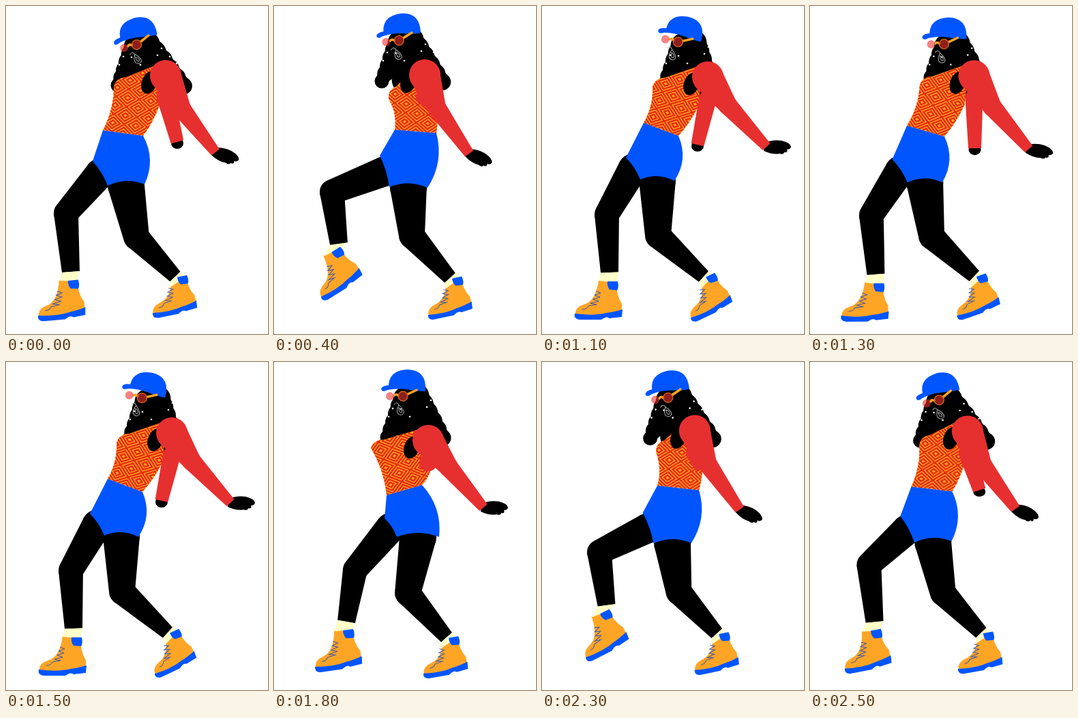
Animation of 384x480 px, one loop 2600 ms. Source, as an HTML page with a canvas:

```html
<!DOCTYPE html>
<html lang="en">
<head>
<meta charset="utf-8">
<title>Dancer</title>
<style>
html, body { margin: 0; height: 100%; overflow: hidden; background: #fff; }
canvas { display: block; }
</style>
</head>
<body>
<canvas id="stage" width="384" height="480"></canvas>
<script>
const ctx = document.getElementById('stage').getContext('2d');
const BLUE = '#0055ff', RED = '#e63030', ORANGE = '#ffa526', CREAM = '#ffffc8', BLACK = '#000';

// The dance runs forward for 13 steps, then back again.
const STEP = 100, HALF = 13;
const keys = [0, 4, 6, 8, 11], SPAN = 15;

// Joints at the key steps: x, y and, where a part turns, degrees.
const rig = {
  head: [[192,38,-14], [186,32,-7], [190,30,-2], [194,32,0], [208,36,12]],
  shoulder: [[234,102], [221,101], [220,108], [226,115], [243,104]],
  elbow: [[257,150], [238,148], [236,152], [256,154], [272,145]],
  wrist: [[307,214,18], [286,216,22], [291,213,-5], [307,213,0], [329,206,0]],
  farWrist: [[251,199], [228,142], [226,138], [223,152], [228,203]],
  chest: [[158,118], [168,136], [151,136], [142,126], [162,118]],
  waistL: [[142,182], [177,181], [176,187], [165,195], [149,171]],
  waistR: [[201,190], [238,186], [233,180], [217,180], [200,190]],
  hemL: [[127,227], [155,219], [168,222], [162,229], [123,222]],
  crotch: [[149,263], [169,265], [181,257], [180,256], [144,254]],
  hemR: [[203,261], [225,266], [240,267], [242,256], [194,256]],
  kneeL: [[88,303], [85,272], [101,281], [119,304], [95,305]],
  kneeR: [[191,338], [202,336], [198,340], [196,338], [170,336]],
  ankleL: [[95,389,-5], [95,348,-32], [99,361,-20], [106,380,-8], [99,390,0]],
  ankleR: [[248,396,-11], [258,398,-12], [254,401,-12], [253,403,-10], [237,396,-25]]
};

const cap = new Path2D('M28,10Q30,-20 2,-21Q-25,-20 -26,2Q-37,3 -37,8Q-35,13 -28,9Q-14,6 0,8Q14,11 27,11Z');
const mouth = new Path2D('M-18,30Q-14,25 -11,31Q-3,38 -4,43Q-8,48 -13,43Q-15,38 -11,31M-11,35Q-5,38 -7,42Q-11,43 -11,35');
const fist = new Path2D('M-3,-6Q10,-11 22,-9Q35,-6 36,0Q35,4 30,4Q32,9 26,8Q25,12 19,10Q10,12 -4,6Z');
const sole = new Path2D('M23,42Q10,46 0,47Q-20,52 -47,48Q-49,56 -40,57L-8,57Q0,51 4,55L22,53Z');
const collar = new Path2D('M1,1L16,1Q18,10 15,14L4,13Q0,8 1,1Z');
const laces = new Path2D('M-16,15L-9,18L-18,21L-10,24L-20,27L-12,30L-24,33L-15,35L-27,37Q-29,42 -36,42');
const sparkles = [[-20,36], [-8,37], [-26,48], [30,34], [36,24], [48,36], [58,46], [46,16], [5,48]];

// Smooth cyclic blend of one joint's key places.
function blend(joint, f) {
  const n = keys.length;
  const at = i => keys[(i + n) % n] + SPAN * Math.floor(i / n);
  const val = (i, j) => joint[(i + n) % n][j];
  const i = keys.findLastIndex(k => k <= f);
  const d = at(i + 1) - at(i), u = (f - at(i)) / d;
  const slope = (k, j) => d * (val(k + 1, j) - val(k - 1, j)) / (at(k + 1) - at(k - 1));
  return joint[0].map((_, j) => {
    const a = val(i, j), b = val(i + 1, j);
    return a + (b - a) * u * u * (3 - 2 * u) +
      slope(i, j) * u * (1 - u) ** 2 - slope(i + 1, j) * u * u * (1 - u);
  });
}

const lerp = (a, b, t) => [a[0] + (b[0] - a[0]) * t, a[1] + (b[1] - a[1]) * t];
const shift = (p, x, y) => [p[0] + x, p[1] + y];

function fill(path, color) {
  ctx.fillStyle = color;
  ctx.fill(path);
}

function stroke(path, color, width) {
  ctx.strokeStyle = color;
  ctx.lineWidth = width;
  ctx.stroke(path);
}

function disc([x, y], rx, ry = rx, tilt = 0) {
  const path = new Path2D();
  path.ellipse(x, y, rx, ry, tilt, 0, Math.PI * 2);
  return path;
}

// Closed outline; each point is [place, bow of the edge leading to it].
function outline(...points) {
  const path = new Path2D();
  let from = points.at(-1)[0];
  path.moveTo(...from);
  for (const [to, bow = 0] of points) {
    const mid = lerp(from, to, 0.5), len = Math.hypot(to[0] - from[0], to[1] - from[1]) || 1;
    const k = 2 * bow / len;
    path.quadraticCurveTo(mid[0] + (to[1] - from[1]) * k, mid[1] - (to[0] - from[0]) * k, ...to);
    from = to;
  }
  return path;
}

// Tapering limb with round joints and a flat end.
function limb(joints, radii, color) {
  for (let i = 0; i < joints.length - 1; i++) {
    const a = joints[i], b = joints[i + 1];
    const angle = Math.atan2(b[1] - a[1], b[0] - a[0]);
    const side = (p, r) => [shift(p, -r * Math.sin(angle), r * Math.cos(angle))];
    fill(disc(a, radii[i]), color);
    fill(outline(side(a, radii[i]), side(b, radii[i + 1]), side(b, -radii[i + 1]), side(a, -radii[i])), color);
  }
}

function placed([x, y, deg], scale, draw) {
  ctx.save();
  ctx.translate(x, y);
  ctx.rotate(deg * Math.PI / 180);
  ctx.scale(scale, scale);
  draw();
  ctx.restore();
}

function lock(a, ra, b, rb) {
  limb([a, b], [ra, rb], BLACK);
  for (let t = 0; t <= 1; t += 0.2) fill(disc(lerp(a, b, t), ra + (rb - ra) * t + 1.5), BLACK);
}

function drawHair({ head }) {
  lock(shift(head, -1, 22), 17, shift(head, -28, 78), 9);
  lock(shift(head, 8, 22), 20, shift(head, 12, 75), 24);
  lock(shift(head, 14, 18), 18, shift(head, 53 - head[2] * 1.1, 79), 11);
  for (const [x, y] of sparkles) fill(disc(shift(head, x, y), 1.3), '#fff');
}

function drawLeg(joints, radii, foot, scale, slant) {
  const ankle = joints[2], knee = joints[1], r = radii[2];
  limb(joints, radii, BLACK);
  placed(foot, scale, () => {
    fill(new Path2D(`M-12,${slant}L15,1Q13,20 22,34L22,50L-46,52Q-48,39 -34,35Q-16,30 -12,${slant}Z`), ORANGE);
    fill(sole, BLUE);
    stroke(laces, '#3a55b0', 1);
  });
  const turn = foot[2] * Math.PI / 180, c = Math.cos(turn) * scale, s = Math.sin(turn) * scale;
  const spot = (x, y) => shift(foot, x * c - y * s, x * s + y * c);
  const dir = Math.atan2(ankle[1] - knee[1], ankle[0] - knee[0]);
  const nx = -r * Math.sin(dir), ny = r * Math.cos(dir);
  fill(outline([shift(ankle, nx, ny)], [shift(ankle, -nx, -ny)], [spot(14, 3)], [spot(-12, slant + 1)]), CREAM);
  placed(foot, scale, () => fill(collar, BLUE));
}

function drawTorso({ waistL, waistR, chest, shoulder }) {
  const strap = shift(shoulder, -8, -18);
  const pit = [(shoulder[0] + waistR[0]) / 2 + 8, shoulder[1] + 42];
  const path = outline([waistL], [chest, -4], [shift(lerp(chest, strap, 0.25), 0, -5), 4], [strap], [pit], [waistR, 2]);
  const tilt = Math.atan2(waistR[1] - waistL[1], waistR[0] - waistL[0]) * 180 / Math.PI;
  const W = 17, H = 13, weave = new Path2D();
  for (let row = -10; row < 3; row++) {
    for (let col = -6; col < 7; col++) {
      if ((row + col) % 2) continue;
      for (const s of [1, 0.64, 0.28]) {
        const x = col * W, y = row * H;
        weave.moveTo(x - W * s, y);
        weave.lineTo(x, y - H * s);
        weave.lineTo(x + W * s, y);
        weave.lineTo(x, y + H * s);
        weave.closePath();
      }
    }
  }
  fill(path, ORANGE);
  ctx.save();
  ctx.clip(path);
  placed([...lerp(waistL, waistR, 0.5), tilt], 1, () => stroke(weave, '#e8290b', 2.3));
  ctx.restore();
  fill(disc(shift(shoulder, -24, 10), 11, 17, 0.35), BLACK);
}

function drawShorts({ waistL, waistR, hemL, crotch, hemR }) {
  fill(outline([waistL], [waistR], [hemR, 9], [crotch, -6], [hemL, -2]), BLUE);
}

function drawArms({ shoulder, elbow, wrist, farWrist }) {
  const shown = Math.min(1, Math.max(0, (farWrist[1] - 160) / 30));
  fill(disc(shift(farWrist, 0, 2), 9, 8 * shown), BLACK);
  limb([shift(shoulder, 0, 32), farWrist], [13, 9.5], RED);
  placed(wrist, 1, () => fill(fist, BLACK));
  limb([shoulder, elbow, wrist], [23, 14, 7.5], RED);
}

function drawHead({ head }) {
  placed(head, 1, () => {
    fill(cap, BLUE);
    ctx.lineCap = 'round';
    stroke(new Path2D('M2,15L15,9M-18,17Q-15,14 -12,17'), ORANGE, 3.5);
    for (const [x, r] of [[-24, 6], [-5, 7]]) {
      const lens = disc([x, 18], r);
      fill(lens, 'rgba(236,50,50,.6)');
      if (r > 6) stroke(lens, '#d8641c', 1.3);
    }
    stroke(mouth, '#b0b0b0', 1);
  });
}

function draw(f) {
  const p = {};
  for (const name in rig) p[name] = blend(rig[name], f);
  // The arm flings outward before settling.
  if (f > 8 && f < 11) p.wrist[0] += 18 * Math.sin(Math.PI * (f - 8) / 3);

  const { hemL, crotch, hemR, kneeL, kneeR, ankleL, ankleR } = p;
  const footL = [ankleL[0] - 4 + ankleL[2] / 4, ankleL[1] + 12, ankleL[2]];
  const footR = [ankleR[0] + 2, ankleR[1], ankleR[2]];
  ctx.clearRect(0, 0, 384, 480);
  drawHair(p);
  drawLeg([lerp(crotch, hemR, 0.5), kneeR, ankleR], [27, 19, 10.5], footR, 0.95, 13);
  drawLeg([lerp(hemL, crotch, 0.5), kneeL, ankleL], [22, 18, 13], footL, 1, -1);
  drawTorso(p);
  drawShorts(p);
  drawArms(p);
  drawHead(p);
}

function tick() {
  const step = Math.floor(performance.now() / STEP) % (2 * HALF);
  draw(HALF - Math.abs(HALF - step));
  requestAnimationFrame(tick);
}
tick();
</script>
</body>
</html>
```
